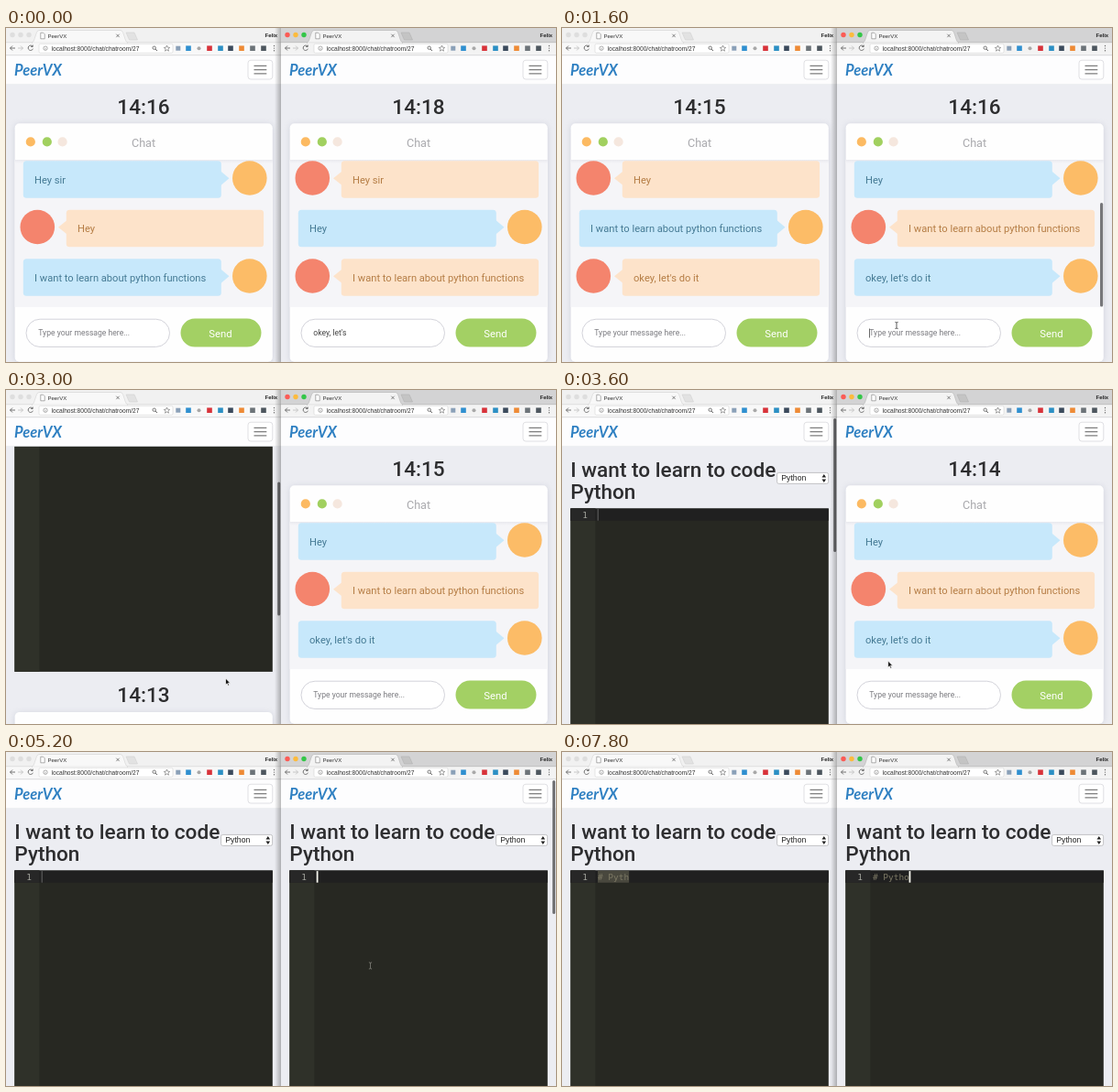
Write an HTML page that moves like this. It is 600 px wide and 365 px high and loops after 8 s.

```html
<!DOCTYPE html>
<html lang="en">
<head>
<meta charset="utf-8">
<title>Two-window chat</title>
<style>
  html, body { margin: 0; width: 100%; height: 100%; overflow: hidden; background: #ecedf2; }
  #stage { display: block; width: 100vw; height: 100vh; }
  text { font-family: Roboto, sans-serif; white-space: pre; }
  .ui { font-family: "Liberation Sans", Arial, sans-serif; }
  .mono { font-family: "DejaVu Sans Mono", monospace; font-size: 9.45px; }
  .big { font-size: 22.6px; font-weight: 500; fill: #2d2d2f; }
  .mid { text-anchor: middle; }
  .msg { font-size: 11.15px; }
  .field { font-size: 8.6px; }
  .logo { font-family: Lato, sans-serif; font-size: 16.5px; font-style: italic; font-weight: 700; fill: #2f80c2; }
</style>
</head>
<body>
<svg id="stage" viewBox="0 0 600 365" preserveAspectRatio="none"></svg>
<script>
const LOOP = 8000, BOTTOM = 407, ROW = 53.5, SENT = 700;
const stage = document.getElementById('stage');

const rect = (x, y, w, h, fill, extra = '') =>
  `<rect x="${x}" y="${y}" width="${w}" height="${h}" fill="${fill}" ${extra}/>`;
const dot = (x, y, r, fill, extra = '') =>
  `<circle cx="${x}" cy="${y}" r="${r}" fill="${fill}" ${extra}/>`;
const path = (d, extra) => `<path d="${d}" ${extra}/>`;
const text = (x, y, str, cls, extra = '') =>
  `<text x="${x}" y="${y}" class="${cls}" ${extra}>${str}</text>`;
const line = (d, color, w = 1) => path(d, `fill="none" stroke="${color}" stroke-width="${w}"`);

function chrome(active) {
  const strip = active ? '#d3d3d4' : '#f1f1f1';
  const tab = active ? '#f3f3f3' : '#f8f8f8';
  const edge = active ? '#b2b2b2' : '#d2d2d2';
  const lights = active ? ['#fb5b55', '#fcbb3d', '#34c648'] : ['#dedede', '#dedede', '#dedede'];
  const marks = [[199, '#2f8fd0'], [222, '#d8323a'], [234, '#2b8fc4'], [245, '#3b4a5c'],
                 [257, '#ee8a35'], [269, '#6c7378'], [281, '#4d565e']];
  return rect(0, 0, 300, 17, strip) + rect(0, 16, 300, 14, tab) + line('M0 29.7H300', '#cfcfd2', .7) +
    '<g transform="translate(0 -.5)">' +
    lights.map((c, i) => dot(7 + i * 9, 8, 2.7, c)).join('') +
    line('M0 16.2H300', edge, .6) +
    path('M28 16.6C32 16 32 3 36 3H125C129 3 129 16 133 16.6Z', `fill="${tab}" stroke="${edge}" stroke-width=".6"`) +
    rect(29, 16.3, 103, 1, tab) +
    path('M131 5.5H140L143.5 13.5H134.5Z', `fill="${active ? '#c4c4c4' : '#e2e2e2'}" stroke="${edge}" stroke-width=".6"`) +
    path('M37.8 5.7H40.6L42.2 7.3V12.3H37.8Z', 'fill="#fff" stroke="#777" stroke-width=".6"') +
    text(45.5, 11.5, 'PeerVX', 'ui', 'font-size="6" fill="#333"') +
    line('M120.3 7.2L123.7 10.6M123.7 7.2L120.3 10.6', '#555', .7) +
    text(282.5, 10.8, 'Felix', 'ui', 'font-size="6" font-weight="700" fill="#222"') +
    line('M10 22.5H4.5M7 20L4.5 22.5L7 25', '#555', .8) +
    line('M13 22.5H18.5M16 20L18.5 22.5L16 25', '#bbb', .8) +
    line('M29 20.6A2.7 2.7 0 1 0 29.4 23.2M29.2 19V21H27.2', '#555', .8) +
    rect(36, 17.8, 146, 10, '#fff', 'rx="1.5" stroke="#d5d5d5" stroke-width=".6"') +
    dot(43, 22.7, 2.2, 'none', 'stroke="#777" stroke-width=".6"') + line('M43 22.3V24', '#777', .6) +
    text(49.5, 25, 'localhost:8000/chat/chatroom/27', 'ui', 'font-size="6.65" fill="#333"') +
    dot(161.7, 22.2, 1.7, 'none', 'stroke="#555" stroke-width=".8"') + line('M163 23.5L165 25.5', '#555', .9) +
    path('M175.5 19.5L176.4 21.7L178.7 21.9L176.9 23.4L177.5 25.7L175.5 24.4L173.5 25.7L174.1 23.4L172.3 21.9L174.6 21.7Z',
      'fill="none" stroke="#666" stroke-width=".6"') +
    rect(185.3, 20.2, 5, 5, '#8aa0b8') + dot(210.5, 22.7, 2, '#a8a8a8') +
    marks.map(([x, c]) => rect(x - 2.8, 19.9, 5.6, 5.6, c)).join('') +
    [20, 22.6, 25.2].map(y => dot(292.5, y, .7, '#666')).join('') + '</g>';
}

const navbar = () =>
  rect(0, 30, 300, 31.5, '#fdfdfe') + line('M0 61.4H300', '#e8e9ed', .6) +
  text(9, 52, 'PeerVX', 'logo') +
  rect(264, 35.2, 26.8, 20.8, '#fff', 'rx="3" stroke="#dcdce0" stroke-width=".9"') +
  line('M270.5 41.4H284.3M270.5 45.6H284.3M270.5 49.8H284.3', '#7d7d7d', 1.2);

function message(str, mine, i) {
  const y = 145.2 + i * ROW, c = y + 20;
  const fill = mine ? '#c7e8fb' : '#fde3ca';
  const tip = mine ? `M234 ${c - 9}L243.5 ${c - 1}L234 ${c + 7}Z` : `M67 ${c - 9}L57 ${c - 1}L67 ${c + 7}Z`;
  return `<g class="m${i}">` +
    rect(mine ? 18.8 : 65.8, y, mine ? 216 : 215.3, 40.6, fill, 'rx="3.5"') + path(tip, `fill="${fill}"`) +
    dot(mine ? 265.8 : 34.3, y + 18.8, 18.8, mine ? '#fcbc67' : '#f4846d') +
    text(mine ? 31 : 78, y + 24.4, str, 'msg', `fill="${mine ? '#457a94' : '#b57d45'}"`) + '</g>';
}

const chat = right =>
  rect(9.6, 512, 281.2, 260, '#b9bccb', 'rx="5" filter="url(#soft)" opacity=".6"') +
  rect(9.6, 511.2, 281.2, 260.5, '#fefefe', 'rx="5"') +
  `<g transform="translate(0 ${BOTTOM})">` +
  dot(26.8, 124.4, 5.1, '#fcba62') + dot(44.8, 124.4, 5.1, '#a1d05f') + dot(61.6, 124.4, 5.1, '#f5e7de') +
  text(150, 129.8, 'Chat', 'mid', 'font-size="12.6" fill="#a9a9ad"') +
  rect(9.6, 144, 281.2, 161, '#f5f5f8') + rect(9.6, 144, 281.2, 4, 'url(#under)') +
  '<svg x="9" y="144" width="282" height="161" viewBox="9 144 282 161"><g class="list">' +
  ['Hey sir', 'Hey', 'I want to learn about python functions', "okey, let's do it"]
    .map((s, i) => message(s, (i % 2 === 0) !== right, i)).join('') +
  '</g></svg>' +
  rect(287, 191, 3.2, 113.5, '#77777a', 'rx="1.6" class="chatbar"') +
  rect(22, 318.2, 156.5, 30.3, '#fff', 'rx="15.1" stroke="#cfcfd6" stroke-width=".9"') +
  text(35.3, 336.4, '', 'field') + rect(35, 328.5, .8, 10, '#444', 'class="incaret"') +
  rect(190.5, 317.6, 88, 31, '#a3d064', 'rx="15.5"') +
  text(234, 337.8, 'Send', 'mid', 'font-size="11.3" fill="#fff"') + '</g>';

const page = right =>
  text(9.3, 94.6, 'I want to learn to code', 'big') + text(9.3, 119, 'Python', 'big') +
  rect(234.6, 90.4, 56, 12, '#fff', 'rx="2" stroke="#b5b5b8" stroke-width=".8"') +
  text(239.3, 99.3, 'Python', 'ui', 'font-size="8.7" fill="#222"') +
  path('M283.5 95.5L285.8 92.1L288.1 95.5ZM283.5 97.5L285.8 100.9L288.1 97.5Z', 'fill="#222"') +
  rect(9.4, 129.5, 281.4, 337.5, '#272822') + rect(9.4, 129.5, 27, 337.5, '#2f3129') +
  rect(9.4, 129.5, 281.4, 13.3, '#202020') + rect(9.4, 129.5, 27, 13.3, '#272727') +
  text(22.3, 140.1, '1', 'mono', 'fill="#a3a49d"') +
  rect(39, 129.8, 0, 13, '#49483e', 'class="sel"') +
  text(39, 140.1, '', 'mono code', 'fill="#7d7965"') +
  rect(38.7, 130.1, 1, 12.6, '#666', 'class="caret"') +
  text(150, 500.5, '', 'big mid timer') + chat(right);

const win = (x, right) =>
  `<svg x="${x}" width="300" height="365" class="${right ? 'right' : 'left'}">` +
  rect(0, 0, 300, 365, '#ecedf2') + `<g class="page">${page(right)}</g>` + navbar() +
  rect(296.2, 31, 3, 146, '#6d6d70', 'rx="1.5" class="bar"') + chrome(right) + '</svg>';

stage.innerHTML = `<defs>
  <filter id="soft" x="-10%" y="-10%" width="120%" height="120%"><feGaussianBlur stdDeviation="3"/></filter>
  <linearGradient id="under" x2="0" y2="1"><stop stop-color="#e9e9ee"/><stop offset="1" stop-color="#f5f5f8"/></linearGradient>
  <linearGradient id="shade"><stop stop-color="#000" stop-opacity="0"/><stop offset="1" stop-color="#000" stop-opacity=".27"/></linearGradient>
  </defs>` + win(0, false) + rect(293, 0, 7, 365, 'url(#shade)') + win(300, true) +
  `<g id="arrow">${path('M0 0V7.2L1.7 5.7L2.8 8.2L4 7.6L2.9 5.2H5.1Z', 'fill="#111" stroke="#fff" stroke-width=".7"')}</g>
  <g id="beam">${line('M-1.6 -3.6Q0 -3.6 0 -2.6V2.6Q0 3.6 -1.6 3.6M1.6 -3.6Q0 -3.6 0 -2.6M0 2.6Q0 3.6 1.6 3.6', 'currentColor', .8)}</g>`;

const parts = {};
for (const side of ['left', 'right']) {
  parts[side] = name => stage.querySelector(`.${side} .${name}`);
}
const arrow = document.getElementById('arrow'), beam = document.getElementById('beam');

const clamp = u => Math.max(0, Math.min(1, u));
const ramp = (t, a, b) => clamp((t - a) / (b - a));
const smooth = u => u * u * (3 - 2 * u);
const set = (el, attrs) => { for (const k in attrs) el.setAttribute(k, attrs[k]); };
const show = (el, on) => el.setAttribute('opacity', +on);

const TYPED = '# Pytho', KEYS = [6000, 6400, 6800, 7200, 7400, 7600, 7800], LAG = 190;
const keyCount = t => KEYS.filter(k => t >= k).length;

// time, x, y
const MOVES = [[1400, 372, 331], [1600, 365, 325], [1900, 360, 322], [2400, 239.5, 315], [3300, 239.5, 315],
               [3700, 376.7, 292.6], [4300, 376.7, 292.6], [4900, 397.5, 233.5], [6000, 397.5, 233.5]];

function pointer(t) {
  const i = MOVES.findIndex(m => m[0] > t);
  const on = i > 0;
  const inInput = t < 1950, inCode = t >= 4250;
  show(arrow, on && !inInput && !inCode);
  show(beam, on && (inInput || inCode));
  if (!on) return;
  const [t0, x0, y0] = MOVES[i - 1], [t1, x1, y1] = MOVES[i];
  const u = smooth(ramp(t, t0, t1));
  const at = `translate(${x0 + (x1 - x0) * u} ${y0 + (y1 - y0) * u})`;
  set(arrow, { transform: at });
  set(beam, { transform: at, color: inCode ? '#85857d' : '#333' });
}

function drawSide(side, t, o) {
  const get = parts[side];
  set(get('page'), { transform: `translate(0 ${-o.scroll})` });
  set(get('bar'), { y: 31 + o.scroll * .4375, opacity: o.bar });
  get('timer').textContent = '14:' + (o.clock - Math.floor((t - o.tick) / 1000) - 1);
  set(get('list'), { transform: `translate(0 ${t < SENT ? 0 : -ROW})` });
  set(get('m3'), { opacity: ramp(t, o.fade, o.fade + 800) });
  set(get('chatbar'), { opacity: t < SENT ? 0 : 1 - ramp(t, o.hide, o.hide + 300) });
  get('code').textContent = TYPED.slice(0, o.chars);
}

function draw(t) {
  const typed = keyCount(t), echoed = keyCount(t - LAG);
  drawSide('left', t, {
    scroll: BOTTOM * (1 - smooth(ramp(t, 2500, 3374))),
    bar: ramp(t, 2450, 2520) * (1 - ramp(t, 4000, 4300)),
    clock: 16, tick: 800, fade: 740, hide: 1150, chars: echoed
  });
  drawSide('right', t, {
    scroll: BOTTOM * (1 - ramp(t, 3620, 4262)) ** 3,
    bar: ramp(t, 3620, 3690) * (1 - ramp(t, 5300, 5600)),
    clock: 18, tick: 400, fade: 680, hide: 1900, chars: typed
  });

  const { left, right } = parts;
  set(left('sel'), { width: echoed * 5.69 });
  show(left('caret'), echoed === 0);
  show(left('incaret'), false);

  const focus = t >= 5000;
  set(right('caret'), {
    x: 38.7 + typed * 5.69, width: focus ? 1.8 : 1, fill: focus ? '#f8f8f0' : '#666',
    opacity: +(!focus || typed > 0 || t < 5500)
  });

  const draft = "okey, let's do it".slice(0, 11 + Math.floor(ramp(t, 50, 550) * 6));
  const typing = t < SENT;
  for (const get of [left, right]) {
    const own = get === right && typing;
    get('field').textContent = own ? draft : 'Type your message here...';
    set(get('field'), { fill: own ? '#444' : '#7c7c81' });
  }
  show(right('incaret'), !typing && t < 2400 && (t % 1000 >= 600 || t % 1000 < 100));
  pointer(t);
}

function frame(now) {
  draw(now % LOOP);
  requestAnimationFrame(frame);
}
draw(0);
requestAnimationFrame(frame);
</script>
</body>
</html>
```
